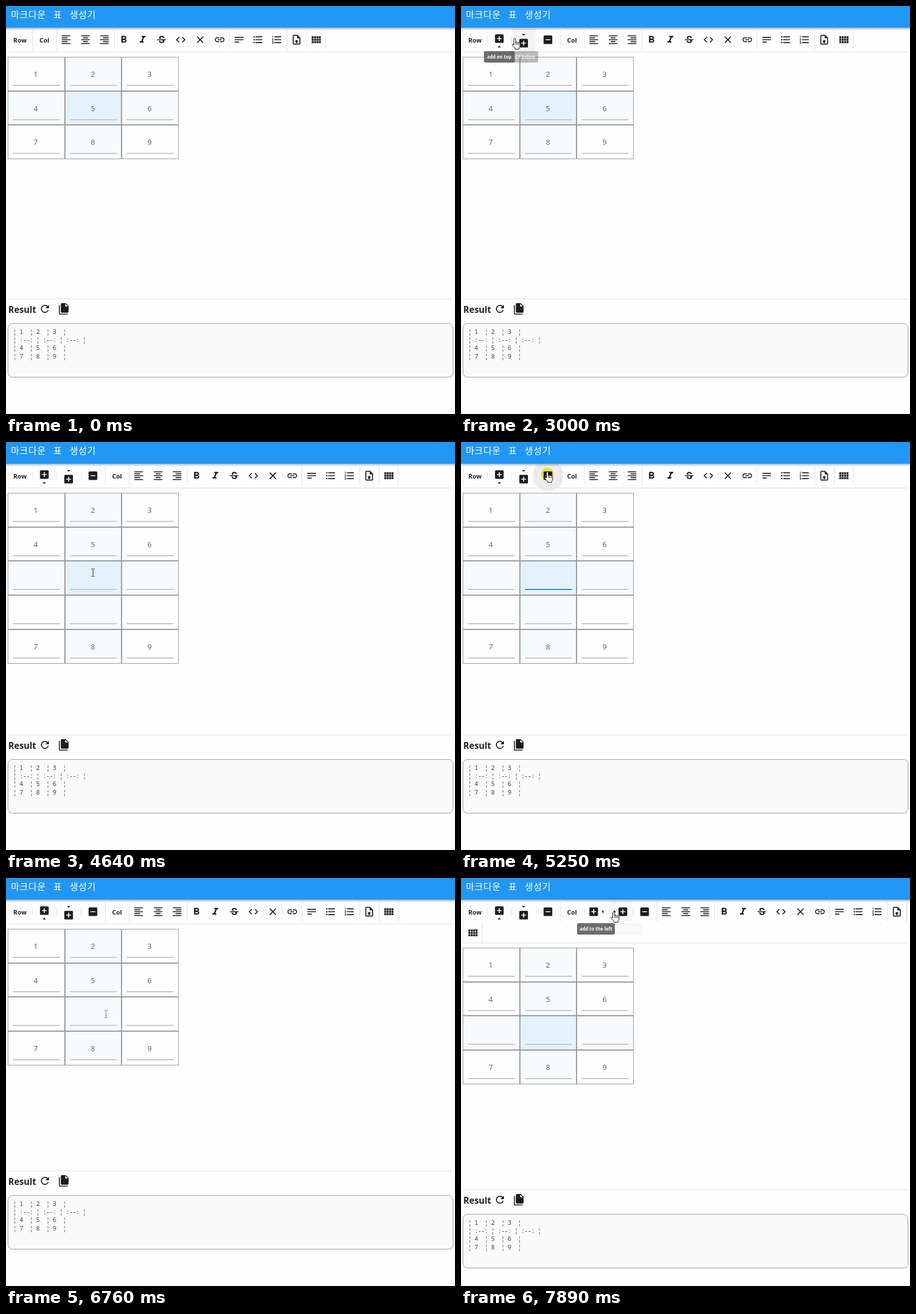
Recreate the animation shown at these times as an HTML page. Size 785 px wide and 714 px high, loop 8 s.

```html
<!DOCTYPE html>
<html lang="ko">
<head>
<meta charset="utf-8">
<title>마크다운 표 생성기</title>
<style>
  html, body { margin: 0; width: 100%; height: 100%; overflow: hidden; background: #fefefe; }
  svg { display: block; }
  text { font-family: 'Noto Sans', 'Open Sans', sans-serif; white-space: pre; }
  .title { font: 500 16px 'Noto Sans CJK KR', 'Noto Sans CJK', sans-serif; fill: #fff; letter-spacing: .6px; word-spacing: 8px; }
  .label { font-size: 11px; font-weight: 600; text-anchor: middle; fill: #222; }
  .digit { font-size: 13px; text-anchor: middle; fill: #666; }
  .tip { font-size: 8px; font-weight: 600; text-anchor: middle; fill: #fff; }
  .result { font-size: 15.5px; font-weight: 600; fill: #222; }
  .code { font: 11px 'Noto Sans Mono', 'DejaVu Sans Mono', monospace; letter-spacing: -.8px; fill: #444; }
</style>
</head>
<body>
<svg id="stage" width="785" height="714" viewBox="0 0 785 714"></svg>
<script>
const LOOP = 8000, TICK = 125;
const stage = document.getElementById('stage');

const box = 'M19,3H5A2,2 0 0,0 3,5V19A2,2 0 0,0 5,21H19A2,2 0 0,0 21,19V5A2,2 0 0,0 19,3Z';
const bars = (x, w) => `M3,3H21V5H3ZM${x},7h${w}v2h-${w}ZM3,11H21V13H3ZM${x},15h${w}v2h-${w}ZM3,19H21V21H3Z`;
const each = (list, fn) => list.map(fn).join('');
const icons = {
  left: bars(3, 12), center: bars(7, 10), right: bars(9, 12),
  bold: 'M13.5,15.5H10V12.5H13.5A1.5,1.5 0 0,1 13.5,15.5M10,6.5H13A1.5,1.5 0 0,1 13,9.5H10M15.6,10.79C16.57,10.11 17.25,9 17.25,8C17.25,5.74 15.5,4 13.25,4H7V18H14.04C16.14,18 17.75,16.3 17.75,14.21C17.75,12.69 16.89,11.39 15.6,10.79Z',
  italic: 'M10,4V7H12.21L8.79,15H6V18H14V15H11.79L15.21,7H18V4H10Z',
  strike: 'M7.2,9.8C6,7.5 7.7,4.8 10.1,4.3C13.2,3.3 17.7,4.7 17.6,8.5H14.6C14.6,7.5 14,6.8 13.3,6.6C12.5,6.3 11.2,6.3 10.5,6.9C9,8.2 10.4,9.5 12,10H7.4ZM21,13V11H3V13H12.6C13.8,13.4 14.3,13.7 14.5,14.3C14.8,15.5 14.4,16.2 13.4,16.5C11.6,17 9.4,16.3 9.5,14.1H6.5C6.4,16.7 8.6,18.5 11,18.8C14.8,19.6 19.3,17.2 17.3,12.9Z',
  code: 'M14.6,16.6L19.2,12L14.6,7.4L16,6L22,12L16,18ZM9.4,16.6L4.8,12L9.4,7.4L8,6L2,12L8,18Z',
  clear: 'M19,6.41L17.59,5L12,10.59L6.41,5L5,6.41L10.59,12L5,17.59L6.41,19L12,13.41L17.59,19L19,17.59L13.41,12Z',
  link: 'M3.9,12A3.1,3.1 0 0,1 7,8.9H11V7H7A5,5 0 0,0 7,17H11V15.1H7A3.1,3.1 0 0,1 3.9,12M8,13H16V11H8ZM17,7H13V8.9H17A3.1,3.1 0 0,1 17,15.1H13V17H17A5,5 0 0,0 17,7Z',
  text: 'M3,6H21V8H3ZM3,11H21V13H3ZM3,16H12V18H3Z',
  bullets: each([6, 12, 18], y => `M7,${y - 1}H21v2H7ZM2.5,${y}a1.5,1.5 0 1,0 3,0a1.5,1.5 0 1,0 -3,0Z`),
  numbers: 'M7,5H21V7H7ZM7,11H21V13H7ZM7,17H21V19H7ZM3,8V5H2V4H4V8ZM2,17V16H5V20H2V19H4V18.5H3V17.5H4V17ZM2,10H5V11L3.12,13H5V14H2V13.08L4,11H2Z',
  upload: 'M14,2L20,8V20A2,2 0 0,1 18,22H6A2,2 0 0,1 4,20V4A2,2 0 0,1 6,2H14M18,20V9H13V4H6V20H18M12,12L16,16H13.5V19H10.5V16H8Z',
  grid: each([3, 8, 13, 18], x => each([5, 10, 15], y => `M${x},${y}h4v4h-4Z`)),
  plus: 'M17,13H13V17H11V13H7V11H11V7H13V11H17Z' + box,
  minus: 'M17,13H7V11H17Z' + box,
  refresh: 'M17.65,6.35A8,8 0 1,0 19.73,14H17.65A6,6 0 1,1 16.22,7.78L13,11H20V4Z',
  copy: 'M15,7H20.5L15,1.5ZM8,0H16L22,6V18A2,2 0 0,1 20,20H8A2,2 0 0,1 6,18V2A2,2 0 0,1 8,0M4,4V22H20V24H4A2,2 0 0,1 2,22V4Z'
};

const rect = (x, y, w, h, fill, more = '') => `<rect x="${x}" y="${y}" width="${w}" height="${h}" fill="${fill}" ${more}/>`;
const label = (cls, x, y, s) => `<text class="${cls}" x="${x}" y="${y}">${s}</text>`;
const icon = (name, x, y = 59, s = .84) =>
  `<path transform="translate(${x} ${y}) scale(${s}) translate(-12 -12)" fill="#1c1c1c" fill-rule="evenodd" d="${icons[name]}"/>`;
const shift = (x, y, body) => `<g transform="translate(${x} ${y})">${body}</g>`;
const divider = x => rect(x, 42, 1, 34, '#e0e0e0');
const notch = x => rect(x, 53, 1, 12, '#e4e4e4');
const arrowhead = (x, y, turn) =>
  `<path transform="translate(${x} ${y}) rotate(${turn})" d="M-3,1.5L0,-1.5L3,1.5Z" fill="#1c1c1c"/>`;
const drawer = (x, w, body) => w
  ? `<svg x="${x}" y="40" width="${w}" height="40">${shift(-x, -40, body)}</svg>` : '';

const rowTools = notch(46) + icon('plus', 67, 57) + arrowhead(67, 71, 0) + notch(88) +
  arrowhead(109.5, 50.5, 180) + icon('plus', 109.5, 65) + notch(131) + icon('minus', 152);
const colTools = notch(215) + icon('plus', 232) + arrowhead(247.5, 59, -90) + notch(258) +
  arrowhead(269, 59, 90) + icon('plus', 283) + notch(300) + icon('minus', 321);
const mainTools = each(Object.entries({
  left: 105, center: 139, right: 172, bold: 206, italic: 239, strike: 272, code: 305.5, clear: 339.5,
  link: 373.5, text: 407.5, bullets: 440.5, numbers: 473.5, upload: 508
}), ([name, x]) => icon(name, x)) + each([88, 189, 390, 491, 525], divider) + notch(322) + notch(356);
const gridTool = icon('grid', 542) + divider(558);

// Pointer stops: tick, x, y
const path = [
  [6, 400, 666], [7, 283, 471], [9, 241, 318], [10, 203, 242], [11, 153, 200], [12, 183, 192],
  [16, 183, 192], [19, 40, 75], [20, 13, 58], [22, 45, 58], [23, 70, 58], [24, 94, 57], [26, 107, 56],
  [31, 107, 56], [36, 150, 238], [39, 156, 210], [41, 153, 75], [42, 151, 52], [49, 151, 52],
  [51, 165, 150], [53, 175, 238], [56, 175, 238], [58, 190, 100], [59, 190, 58], [60, 205, 60],
  [62, 248, 60], [63, 267, 59]
];

// State changes by tick; each one adds to those before
const changes = {
  0: { rows: ['123', '456', '789'], row: 1, caret: 0, blue: 0, rowW: 0, colW: 0, halo: 0, ripple: 0, hover: null, tips: [] },
  14: { caret: 1 },
  15: { blue: .5 },
  16: { blue: 1 },
  20: { halo: 1 },
  21: { halo: 0, caret: 0, blue: 0, rowW: 60 },
  22: { rowW: 127 },
  23: { tips: [['top', .6]] },
  24: { tips: [['below', .42], ['top', .92]], hover: [89, '#f3f3f3'] },
  25: { tips: [['below', .8], ['top', .4]] },
  26: { tips: [['below', .92]], hover: [89, '#eee'] },
  28: { rows: ['123', '456', '', '789'], tips: [['below', .4]] },
  29: { tips: [], hover: [89, '#e4e4e4'] },
  30: { rows: ['123', '456', '', '', '789'] },
  33: { hover: null },
  37: { row: 2 },
  38: { caret: 1 },
  39: { blue: .5, caret: 0 },
  40: { blue: 1 },
  42: { halo: 1, ripple: 1 },
  43: { rows: ['123', '456', '', '789'], row: -1, blue: 0, halo: 0, ripple: .5 },
  45: { ripple: 0, hover: [132, '#f3f3f3'] },
  50: { hover: null },
  55: { row: 2 },
  56: { caret: 1 },
  57: { blue: 1, caret: 0 },
  59: { colW: 19, halo: 1 },
  60: { colW: 80, halo: 0, blue: 0 },
  61: { colW: 127 },
  62: { tips: [['toLeft', .6]] },
  63: { tips: [['toRight', .04], ['toLeft', .92]], hover: [259, '#f7f7f7'] }
};

const tipSpecs = {
  top: ['add on top', 67, 54], below: ['add below', 109.5, 51],
  toLeft: ['add to the left', 236, 66], toRight: ['add to the right', 283, 68]
};
const tip = ([name, alpha]) => {
  const [s, x, w] = tipSpecs[name];
  return `<g opacity="${alpha}">${rect(x - w / 2, 79, w, 20, '#616161', 'rx="3"')}${label('tip', x, 92, s)}</g>`;
};

const stateAt = k => Object.assign({}, ...Object.keys(changes).filter(t => t <= k).map(t => changes[t]));

function pointerAt(k) {
  if (k < path[0][0]) return null;
  const i = path.findLastIndex(p => p[0] <= k);
  const a = path[i], b = path[i + 1] || a;
  const f = b === a ? 0 : (k - a[0]) / (b[0] - a[0]);
  return [a[1] + (b[1] - a[1]) * f, a[2] + (b[2] - a[2]) * f];
}

const edgeX = c => 3 + Math.round(99.5 * c);
const edgeY = r => 89 + Math.round(59.7 * r);

function cell(s, r, c) {
  const x = edgeX(c), y = edgeY(r), w = edgeX(c + 1) - x, h = edgeY(r + 1) - y;
  const active = r === s.row && c === 1;
  const fill = active ? '#e3f2fd' : r === s.row || c === 1 ? '#f7fbfe' : '#fefefe';
  const mid = x + 49, ux = x + 9;
  return rect(x + .5, y + .5, w - 1, h - 1, fill, 'stroke="#999"') +
    rect(ux, y + 49, 82, 2, active && s.caret ? '#a9b3ba' : '#c8c8c8') +
    (active && s.blue ? rect(ux + 41 * (1 - s.blue), y + 49, 82 * s.blue, 2, '#2a93e0') : '') +
    label('digit', mid, y + 35, s.rows[r][c] || '') +
    (active && s.caret ? rect(mid + (s.rows[r] ? 4 : 0), y + 22, 1, 16, '#2a84c8') : '');
}

const codeLines = ['¦ 1  ¦ 2  ¦ 3  ¦', '¦ :--: ¦ :--: ¦ :--: ¦', '¦ 4  ¦ 5  ¦ 6  ¦', '¦ 7  ¦ 8  ¦ 9  ¦'];
const resultPart = rect(3, 512, 779, 1, '#dedede') + label('result', 4, 537, 'Result') +
  icon('refresh', 68, 530, .88) + icon('copy', 101, 530) +
  rect(3.5, 555.5, 778, 94, '#fafafa', 'rx="8" stroke="#999"') +
  each(codeLines, (line, i) => label('code', 12, 574 + 14.2 * i, line));

function pointer(p, k, s) {
  const [x, y] = p;
  const inTable = x < 302 && y > 89 && y < edgeY(s.rows.length);
  if (y < 79) return shift(x, y, '<path fill="#fff" stroke="#111" stroke-linejoin="round" d="M-1.5,1.5a1.5,1.5 0 0 1 3,0V7.5L2,6.5a1.4,1.4 0 0 1 2.4,.6a1.4,1.4 0 0 1 2.5,.6a1.3,1.3 0 0 1 2.3,1V13Q9,15 7.5,16.5V18.5H.5V17L-4.5,11.5Q-5,9.5 -3,9.8L-1.5,11Z"/><path stroke="#111" d="M2,7v4M4.5,8v3M7,8.5v3"/>');
  if (inTable || y > 555) return shift(x, y, `<path fill="none" stroke="${k >= 50 ? '#777' : '#222'}" d="M-3,-6.5h2.5M.5,-6.5H3M0,-6V6M-3,6.5h2.5M.5,6.5H3"/>`);
  return shift(x, y, '<path fill="#fff" stroke="#111" d="M0,0V16L4,12.5L6.5,18L9,17L6.5,11.5H11.5Z"/>');
}

function scene(k) {
  const s = stateAt(k), p = pointerAt(k);
  const push = s.rowW + s.colW, wrapped = push > 223, drop = wrapped ? 33 : 0;
  const cells = each(s.rows, (_, r) => each([0, 1, 2], c => cell(s, r, c)));
  return '<defs><linearGradient id="shade" x2="0" y2="1"><stop stop-opacity=".28"/><stop offset="1" stop-opacity="0"/></linearGradient></defs>' +
    rect(0, 0, 785, 714, '#fefefe') +
    shift(0, drop, rect(3, 80, 779, 1, '#dedede') + cells + resultPart) +
    (s.hover ? rect(s.hover[0], 40, 41, wrapped ? 36 : 39, s.hover[1]) : '') +
    (s.ripple ? `<circle cx="152" cy="59" r="27" fill="#e8e8e8" opacity="${.8 * s.ripple}"/>` : '') +
    divider(3) + label('label', 24.5, 64, 'Row') + drawer(45, s.rowW, rowTools) +
    shift(s.rowW, 0, divider(46) + label('label', 67, 64, 'Col')) +
    drawer(214, s.colW, colTools) + shift(push, 0, mainTools) +
    (wrapped ? divider(778) + shift(0, 37, divider(3)) + shift(-521.5, 37, gridTool) : shift(push, 0, gridTool)) +
    rect(0, 38, 785, 5, 'url(#shade)') + rect(0, 0, 785, 38, '#2196f3') +
    label('title', 8.5, 21, '마크다운 표 생성기') +
    each(s.tips, tip) +
    (s.halo ? `<circle cx="${p[0]}" cy="${p[1] + 4}" r="11" fill="#fdec3c" opacity=".9" style="mix-blend-mode:multiply"/>` : '') +
    (p ? pointer(p, k, s) : '');
}

let shown = -1;
const start = performance.now();
function frame() {
  const t = (performance.now() - start) % LOOP;
  const k = Math.min(63, Math.floor((t + 5) / TICK));
  if (k !== shown) stage.innerHTML = scene(shown = k);
  requestAnimationFrame(frame);
}
frame();
</script>
</body>
</html>
```
